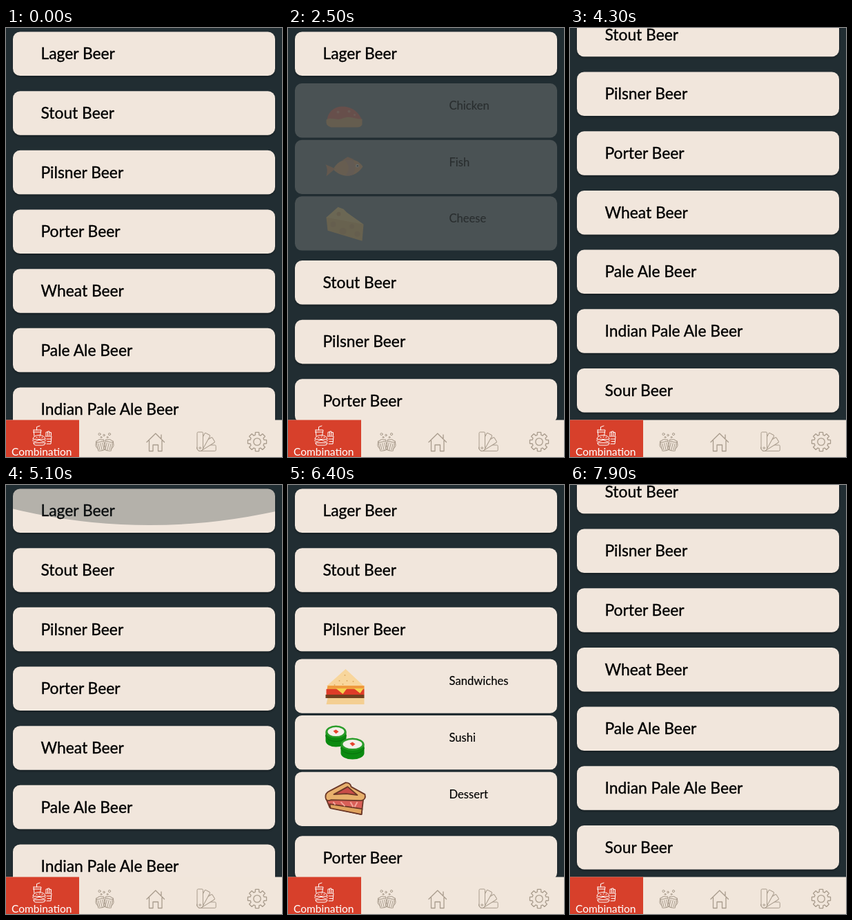
Write an HTML page that moves like this. It is 400 px wide and 620 px high and loops after 8000 ms.

```html
<!DOCTYPE html>
<html lang="en">
<head>
<meta charset="utf-8">
<title>Beer combinations</title>
<style>
  html, body { margin: 0; width: 100%; height: 100%; overflow: hidden; background: #212d32; }
  svg { display: block; width: 100%; height: 100%; }
  text { font-family: Lato, "Open Sans", sans-serif; }
  .title { font-size: 22.8px; stroke: #000; stroke-width: .35px; }
  .food { font-size: 16.6px; stroke: #000; stroke-width: .15px; }
  .tab { font-size: 15.5px; fill: #fff; }
  .line { fill: none; stroke: #a99c8d; stroke-width: 1; stroke-linecap: round; stroke-linejoin: round; }
  .bold { stroke-width: 1.3; }
  .on { stroke: #fff; }
</style>
</head>
<body>
<svg viewBox="0 0 400 620" preserveAspectRatio="none">
  <defs>
    <filter id="shade" x="-5%" y="-15%" width="110%" height="140%">
      <feDropShadow dx="0" dy="2" stdDeviation="1.8" flood-color="#000" flood-opacity=".3"/>
    </filter>
    <clipPath id="lagerClip"><rect width="400"/></clipPath>
    <clipPath id="pilsnerClip"><rect width="400"/></clipPath>
  </defs>
  <rect width="400" height="620" fill="#212d32"/>
  <g id="list"></g>
  <circle id="glow" cx="208" r="845" fill="#212d32"/>
  <rect y="566.5" width="400" height="53.5" fill="#f1e6db"/>
  <rect y="566.5" width="106" height="53.5" fill="#d7402b"/>
  <text class="tab" x="8" y="618">Combination</text>
  <g id="icons"></g>
</svg>
<script>
const LOOP = 8000, STEP = 100;
const CARD = '#f1e6dc', PITCH = 85.67, TOP = 5.5, CARD_H = 63.5;
const OPEN = 244.8, MAX_SCROLL = 113.3, GLOW_R = 845;
const $ = id => document.getElementById(id);

const names = ['Lager', 'Stout', 'Pilsner', 'Porter', 'Wheat', 'Pale Ale', 'Indian Pale Ale', 'Sour'];

const path = (d, fill, more = '') => `<path d="${d}" fill="${fill}" ${more}/>`;
const dot = (x, y, r, fill) => `<circle cx="${x}" cy="${y}" r="${r}" fill="${fill}"/>`;

const roll = (x, y, rx) => `<g transform="translate(${x} ${y})">` +
  path(`M${-rx} 0V13A${rx} 9 0 0 0 ${rx} 13V0Z`, '#0b8a10') +
  path(`M${-rx} 5A${rx} 9 0 0 0 ${rx} 5`, 'none', 'stroke="#08700c"') +
  `<ellipse rx="${rx}" ry="9" fill="#2a9d2a"/><ellipse rx="${rx - 3}" ry="6.5" fill="#f4efe9"/>` +
  path('M-4 -1L0 -3L4 0L0 3Z', '#e8452f') + '</g>';

const pictures = {
  Chicken: path('M-26 14C-25 2 -16 -6 -4 -6C11 -6 20 2 25 14Z', '#d9442a') +
    path('M-27 13C-20 8 -12 15 -3 11C8 6 16 13 25 12L25 20Q23 24 18 24H-20Q-27 22 -27 17Z', '#d08a3c') +
    dot(-10, 2, 2, '#e9805a') + dot(6, 1, 2, '#e9805a') + dot(14, 6, 1.5, '#e9805a'),
  Fish: path('M-17 3C-8 -15 16 -16 26 -1C16 15 -4 17 -17 3Z', '#d98a45') +
    path('M-14 2L-28 -4Q-24 3 -27 13Z', '#c8743a') + path('M-4 -10L4 -15L14 -11Z', '#c8743a') +
    path('M0 -10Q10 0 1 12Q7 13 12 10Q18 0 12 -10Z', '#c98058') +
    dot(18, -2, 2.4, '#e8d8c4') + dot(18.3, -2, 1.2, '#222'),
  Cheese: path('M-27 -9L-10 -24L-2 -21L3 -16L27 1L-24 0Z', '#f0bb55') +
    path('M-27 -9L27 1L25 25L-25 10Z', '#e2a13c') +
    [[-17, 1, 4], [-3, 11, 5], [10, 4, 3.5], [18, 15, 4], [-9, -14, 3]]
      .map(([x, y, r]) => dot(x, y, r, '#d0903a')).join(''),
  Sandwiches: path('M1 -25L28 0H-27Z', '#f8d69c') +
    [[0, -16], [-8, -8], [3, -8], [12, -7], [-15, -2], [-3, -3]].map(([x, y]) => dot(x, y, .9, '#d9a45c')).join('') +
    path('M-25 -1H28V4H-26Z', '#ef9a3d') + path('M-27 4H28V12H-27Z', '#de3c28') +
    path('M-13 3H3L-3 11ZM13 3H27L22 10Z', '#f5d14e') + path('M-28 12H28V17H-28Z', '#70401f') +
    path('M-25 17H28V26H-27Z', '#f4cf92'),
  Sushi: roll(-13, -16, 15) + roll(11, 2, 17),
  Dessert: '<g stroke="#6b3727" stroke-width="1.8" stroke-linejoin="round">' +
    path('M-27 0L27 -3L24 22L-22 12Z', '#d95f58') + path('M-22 7L25 14L24 22L-21 13Z', '#e0a35e') +
    path('M-28 -2Q-29 -9 -22 -12L1 -24Q8 -24 9 -18L29 -7Q31 0 24 2L-20 1Q-27 4 -28 -2Z', '#e7b06c') +
    path('M-16 -7L4 -18L18 -6L2 -8Z', '#c94d48') + '</g>' +
    path('M-17 4L-14 8M-6 4L0 10M8 4L12 11M18 4L14 11', 'none', 'stroke="#f4a59b" stroke-width="2"')
};

const panels = {
  Lager: { row: 0, foods: ['Chicken', 'Fish', 'Cheese'], clip: 'lagerClip' },
  Pilsner: { row: 2, foods: ['Sandwiches', 'Sushi', 'Dessert'], clip: 'pilsnerClip' }
};

const foodCard = (food, i) => `<g transform="translate(0 ${i * 81.6})">
  <rect class="sheet" x="10" width="380" height="78.3" rx="10" fill="${CARD}"/>
  <g class="pic" transform="translate(82.5 39.5)">${pictures[food]}</g>
  <text class="food" x="233.5" y="38">${food}</text></g>`;

$('list').innerHTML =
  Object.entries(panels).map(([name, p]) =>
    `<g id="${name}" clip-path="url(#${p.clip})"><g transform="translate(0 ${TOP + p.row * PITCH + 74.6})">
    ${p.foods.map(foodCard).join('')}</g></g>`).join('') +
  names.map(n => `<g class="row"><rect x="10" width="380" height="${CARD_H}" rx="10.5" fill="${CARD}" filter="url(#shade)"/>
    <text class="title" x="50.5" y="39.8">${n} Beer</text></g>`).join('');

function gear(cx, cy) {
  const pts = [];
  for (let i = 0; i < 8; i++)
    for (const [off, r] of [[-.27, 10.3], [-.19, 13.8], [.19, 13.8], [.27, 10.3]]) {
      const a = i * Math.PI / 4 + off;
      pts.push(`${(cx + r * Math.cos(a)).toFixed(2)} ${(cy + r * Math.sin(a)).toFixed(2)}`);
    }
  return `<path d="M${pts.join('L')}Z"/><circle cx="${cx}" cy="${cy}" r="5.2"/>`;
}

const mug = (x, y, turn) => `<g transform="translate(${x} ${y}) rotate(${turn})">
  <path d="M-5.5 -5V7Q0 9 5.5 7V-5M-6 -5Q-6 -8 -3 -7.5Q0 -9.5 3 -7.5Q6 -8 6 -5ZM-3 -3V6M0 -3V7M3 -3V6"/></g>`;
const blade = turn => `<path d="M277 607V585.5Q277 584 278.5 584H284Q285.5 584 285.5 585.5V607A4.25 4.25 0 0 1 277 607"
  fill="#f1e6db" transform="rotate(${turn} 281.2 607)"/>`;

$('icons').innerHTML = `
  <g class="line on">
    <path d="M40 581H51L49.5 589M40 581L41 590M44.5 581V576.5L49 575M39.5 584H50.5"/>
    <path d="M39 594Q40 588.5 48 588.5T57 594ZM38.5 596.5Q42 599 45 596.5T51 596.5T57.5 596.5M40 599.5H57Q57 603 53 603H43Q40 603 40 599.5Z"/>
    <path d="M57 590H66L65 601H59M58 589V584H60.5V589M60.5 584.5V583H63V589M63 584.5H65.5V589M59 594H65.5M60 597.5H65"/>
    <path d="M44 591.5H45M48 591H49M52 591.5H53"/>
  </g>
  <g class="line">
    ${mug(137.5, 603, -14)}${mug(148.5, 603, 14)}
    <path d="M131.5 598Q127 604 134 609M154.5 598Q159 604 152 609"/>
    <circle cx="135.5" cy="587" r="1.6"/><circle cx="142" cy="588.5" r="1.3"/><circle cx="150" cy="587" r="1.6"/>
    <circle cx="138" cy="591.5" r="1"/><circle cx="147" cy="591.5" r="1"/>
  </g>
  <g class="line bold">
    <path d="M204 598.5L216.8 586L229.5 598.5M207.5 596V611.5H213V602.5H220.5V611.5H226V596M225 588V593"/>
  </g>
  <g class="line">
    ${[90, 58, 29, 0].map(blade).join('')}<circle cx="281.2" cy="607" r="1.3"/>
  </g>
  <g class="line bold">${gear(364, 598)}</g>`;

// Eased value through [time, value] stops.
function track(t, stops) {
  if (t <= stops[0][0]) return stops[0][1];
  for (let i = 1; i < stops.length; i++) {
    const [t0, v0] = stops[i - 1], [t1, v1] = stops[i];
    if (t < t1) {
      const k = (t - t0) / (t1 - t0);
      return v0 + (v1 - v0) * k * k * (3 - 2 * k);
    }
  }
  return stops[stops.length - 1][1];
}

const size = {
  Lager: [[2150, 0], [2450, 1], [3450, 1], [3750, 0]],
  Pilsner: [[5650, 0], [5950, 1], [6750, 1], [7050, 0]]
};
const fade = {
  Lager: [[2400, 0], [2750, 1], [3230, 1], [3520, 0]],
  Pilsner: [[5900, 0], [6250, 1], [6550, 1], [6830, 0]]
};
const scroll = [[4200, 0], [4300, 1], [4600, 1], [4950, 0], [7350, 0], [7700, 1]];
const glow = [[1150, 0], [1300, .8], [1400, .8], [1600, 0], [4900, 0], [5100, 1], [5500, 0]];

const rows = [...document.querySelectorAll('.row')];

function setOpacity(group, selector, value) {
  group.querySelectorAll(selector).forEach(e => e.setAttribute('opacity', value));
}

function draw(t) {
  $('list').setAttribute('transform', `translate(0 ${-track(t, scroll) * MAX_SCROLL})`);

  const grow = {};
  for (const [name, p] of Object.entries(panels)) {
    const h = grow[name] = track(t, size[name]) * OPEN;
    const alpha = track(t, fade[name]);
    const clip = $(p.clip).firstElementChild;
    clip.setAttribute('y', TOP + p.row * PITCH + CARD_H);
    clip.setAttribute('height', h + 11);
    const group = $(name);
    group.style.display = h > 0 && alpha > 0 ? '' : 'none';
    setOpacity(group, '.sheet, .pic', alpha);
    setOpacity(group, '.food', Math.sqrt(alpha));
  }
  rows.forEach((row, i) => {
    const push = (i > 0 ? grow.Lager : 0) + (i > 2 ? grow.Pilsner : 0);
    row.setAttribute('transform', `translate(0 ${TOP + i * PITCH + push})`);
  });

  const k = track(t, glow);
  $('glow').setAttribute('cy', 58 * k - GLOW_R);
  $('glow').setAttribute('opacity', .29 * Math.sqrt(k));
}

const start = performance.now();
function tick(now) {
  const t = Math.max(0, now - start) % LOOP;
  draw(Math.floor(t / STEP) * STEP);
  requestAnimationFrame(tick);
}
draw(0);
requestAnimationFrame(tick);
</script>
</body>
</html>
```
